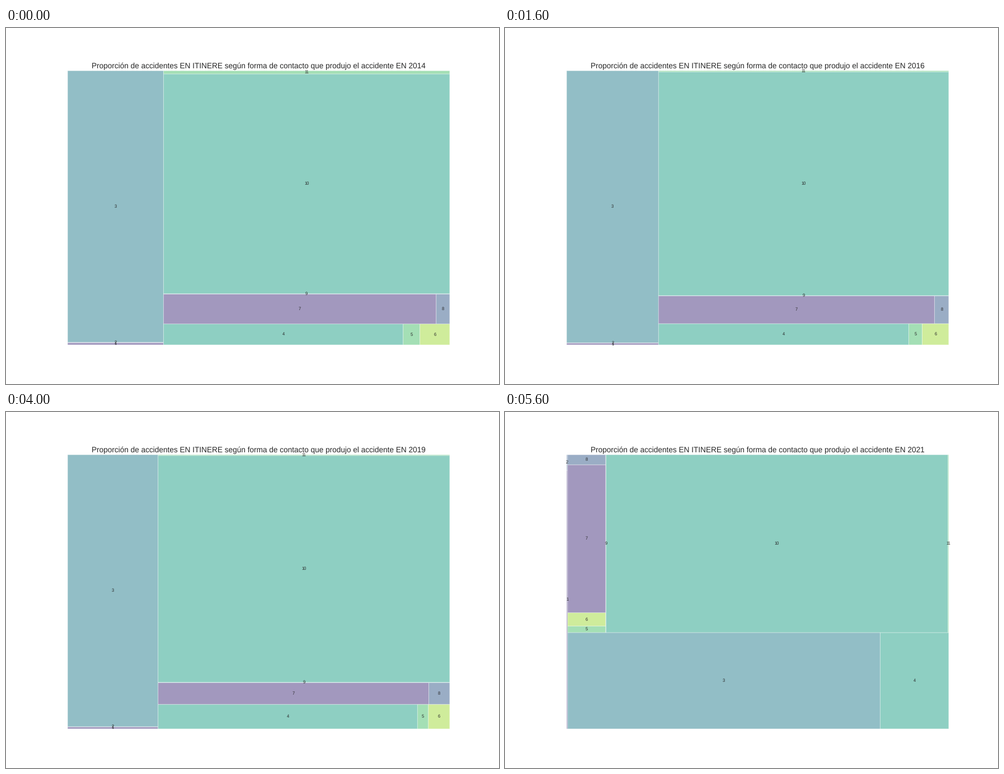
Recreate the animation shown at these times as a matplotlib script. Size 881 px wide and 636 px high, loop 6400 ms.

```python
import numpy as np
import matplotlib.pyplot as plt
from matplotlib.animation import FuncAnimation
from matplotlib.patches import Rectangle

W, H, DPI = 881, 636, 64
PT = 72 / DPI            # points per pixel
L, R = 0.125 * W, 0.9 * W
T, B = 0.12 * H, 0.89 * H
UNIT = 0.755             # one chart point in pixels
PALETTE = ["#46327e", "#365c8d", "#277f8e", "#1fa187", "#4ac16d", "#a0da39"]
TITLE = ("Proporción de accidentes EN ITINERE según forma de contacto "
         "que produjo el accidente EN {}")

plt.rcParams["font.family"] = "Liberation Sans"
plt.rcParams["text.hinting"] = "none"
plt.rcParams["text.color"] = "#262626"

# Column split, tops of 1 and 2, then the row tops and splits on the right:
# xs, top1, top2, top4, 4|5, 5|6, top7, 7|8, top9, top10
SPLITS = {
    2014: [281.5, 562.2, 561.4, 528.7, 709.8, 739.7, 475.2, 768.8, 474.7, 82.0],
    2016: [274.3, 562.9, 562.3, 528.1, 721.5, 745.6, 478.6, 767.7, 478.0, 78.3],
    2018: [275.3, 562.2, 561.6, 525.7, 729.0, 749.7, 482.8, 763.8, 482.2, 78.2],
    2019: [271.8, 562.7, 562.1, 522.2, 735.3, 754.8, 483.5, 755.5, 482.9, 77.8],
    2020: [283.2, 562.7, 562.1, 519.7, 738.3, 758.8, 478.7, 758.9, 478.1, 77.8],
}


def between(a, b):
    return list(np.mean([SPLITS[a], SPLITS[b]], axis=0))


SPLITS[2015] = between(2014, 2016)
SPLITS[2017] = SPLITS[2018][:3] + between(2016, 2018)[3:]


def column(x0, x1, ys):
    """Boxes stacked upwards; ys runs from bottom to top."""
    return [(x0, y1, x1, y0) for y0, y1 in zip(ys, ys[1:])]


def row(y0, y1, xs):
    """Boxes side by side between the heights y0 (top) and y1."""
    return [(x0, y0, x1, y1) for x0, x1 in zip(xs, xs[1:])]


def boxes(year):
    if year == 2021:
        return (column(L, 111.9, [B, 104, T])
                + row(394, B, [111.9, 670.4, R])
                + column(111.9, 180, [394, 382.3, 358.6, 94.2, T])
                + row(T, 394, [180, 180.6, 791.5, R]))
    xs, t1, t2, t4, s45, s56, t7, s78, t9, t10 = SPLITS[year]
    return (column(L, xs, [B, t1, t2, T])
            + row(t4, B, [xs, s45, s56, R])
            + row(t7, t4, [xs, s78, R])
            + column(xs, R, [t7, t9, t10, T]))


fig = plt.figure(figsize=(W / DPI, H / DPI), dpi=DPI, facecolor="white")
ax = fig.add_axes([0, 0, 1, 1])
ax.set_xlim(0, W)
ax.set_ylim(H, 0)
ax.axis("off")

title = ax.text((L + R) / 2, T - 6 * UNIT, "", fontsize=18 * UNIT * PT,
                ha="center", va="baseline")
tiles, labels = [], []
for i in range(11):
    tile = Rectangle((0, 0), 1, 1, facecolor=PALETTE[i % 6], edgecolor="white",
                     alpha=0.5, linewidth=UNIT * PT, snap=False)
    tiles.append(ax.add_patch(tile))
    labels.append(ax.text(0, 0, str(i + 1), fontsize=10 * UNIT * PT,
                          ha="center", va="center"))


def update(k):
    year = 2014 + k
    title.set_text(TITLE.format(year))
    for tile, label, (x0, y0, x1, y1) in zip(tiles, labels, boxes(year)):
        tile.set_bounds(x0, y0, x1 - x0, y1 - y0)
        label.set_position(((x0 + x1) / 2, (y0 + y1) / 2))
    return [title, *tiles, *labels]


anim = FuncAnimation(fig, update, frames=8, interval=800, repeat=True,
                     repeat_delay=0, blit=False)
plt.show()
```
